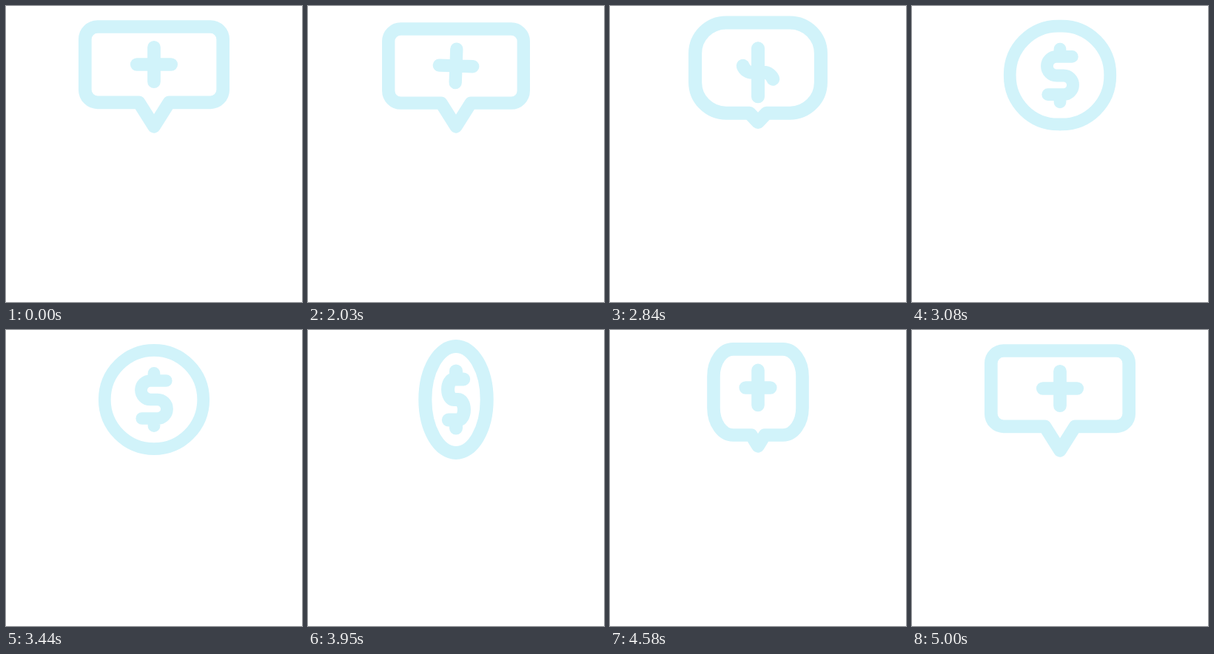
These frames come from a looping animation (400x400 px, 5.03 s). An HTML page with a canvas:

```html
<!DOCTYPE html>
<html lang="en">
<head>
<meta charset="utf-8">
<title>Bubble to coin</title>
<style>
html, body { margin: 0; width: 100%; height: 100%; overflow: hidden; background: #fff; }
canvas { display: block; width: 400px; height: 400px; }
</style>
</head>
<body>
<canvas width="400" height="400"></canvas>
<script>
const ctx = document.querySelector('canvas').getContext('2d');
const LOOP = 5030, START = 2030, STEP = 30;
const SWELL = 530, MORPH = 2530, COIN = 3110, FLIP = 3640, EDGE = 4280;

const mix = (a, b, p) => a + (b - a) * p;
const ramp = (t, from, length) => Math.min(1, Math.max(0, (t - from) / length));
const easeOut = p => 1 - (1 - p) ** 2;

function ease(t, from, length) {
  const p = ramp(t, from, length);
  return p * p * (3 - 2 * p);
}

// Dips quickly below 0, then rises to 1
function swell(t, from) {
  const p = ramp(t, from, SWELL);
  return p - 7 * p * (1 - p) ** 2;
}

// Speech bubble at q = 0, circle at q = 1
function outline(q) {
  const w = mix(93.2, 66.7, q), top = mix(28, 27.3, q), bottom = mix(130.3, 160.7, q);
  const r = mix(17, 66.7, q), base = 20.5 * (1 - q), tip = 32.5 * (1 - q) ** 1.65;
  ctx.moveTo(0, top);
  ctx.arcTo(w, top, w, bottom, r);
  ctx.arcTo(w, bottom, 0, bottom, r);
  ctx.lineTo(base, bottom);
  ctx.lineTo(0, bottom + tip);
  ctx.lineTo(-base, bottom);
  ctx.arcTo(-w, bottom, -w, top, r);
  ctx.arcTo(-w, top, 0, top, r);
  ctx.closePath();
}

// The plus: its crossbar curls into an S while the upright splits into two stubs
function glyph(g, tilt) {
  const split = ramp(g, .65, .35), r = 12.75, tail = 21 * split;
  const arm = mix(23.2, 4.75, easeOut(g)), turn = Math.PI * g * g;
  ctx.translate(0, mix(79, 94, easeOut(g)));
  ctx.rotate(tilt * Math.PI / 180);
  for (let side = 0; side < 2; side++) {
    const sin = Math.sin(turn), cos = Math.cos(turn);
    ctx.moveTo(0, 0);
    ctx.lineTo(-arm, 0);
    ctx.arc(-arm, -r, r, Math.PI / 2, Math.PI / 2 + turn);
    ctx.lineTo(-arm - r * sin - tail * cos, -r + r * cos - tail * sin);
    ctx.moveTo(0, -25.5 * split);
    ctx.lineTo(0, -mix(23.2, 35.7, g));
    ctx.rotate(Math.PI);
  }
}

function draw(t) {
  const round = ease(t, MORPH + 40, 570);
  const q = round - ease(t, EDGE, 520);
  const g = t > EDGE ? 0 : ease(t, MORPH, SWELL);
  const bubble = swell(t, MORPH - SWELL), coin = swell(t, COIN);
  const scale = 1 + .07 * bubble * (1 - round ** 1.5) + .093 * coin * (1 - ease(t, FLIP, 1280));
  const squeeze = 1 - .883 * (ease(t, FLIP, EDGE - FLIP) - easeOut(ramp(t, EDGE, 700)));
  const tilt = -7 * bubble * (1 - ease(t, MORPH, 310));
  const pivot = mix(171, 94, q);

  ctx.setTransform(1, 0, 0, 1, 0, 0);
  ctx.fillStyle = '#fff';
  ctx.fillRect(0, 0, 400, 400);
  ctx.translate(200, pivot);
  ctx.scale(scale * squeeze, scale);
  ctx.translate(0, -pivot);
  ctx.beginPath();
  outline(q);
  glyph(g, tilt);
  // Stroke unsqueezed so the line keeps its weight
  ctx.setTransform(1, 0, 0, 1, 0, 0);
  ctx.lineWidth = mix(17.7, 16.7, q) * scale;
  ctx.lineCap = ctx.lineJoin = 'round';
  ctx.strokeStyle = '#d1f3fa';
  ctx.stroke();
}

const begin = performance.now();
function frame() {
  const t = (performance.now() - begin) % LOOP;
  draw(t < START ? 0 : START + Math.floor((t - START) / STEP) * STEP);
  requestAnimationFrame(frame);
}
frame();
</script>
</body>
</html>
```
